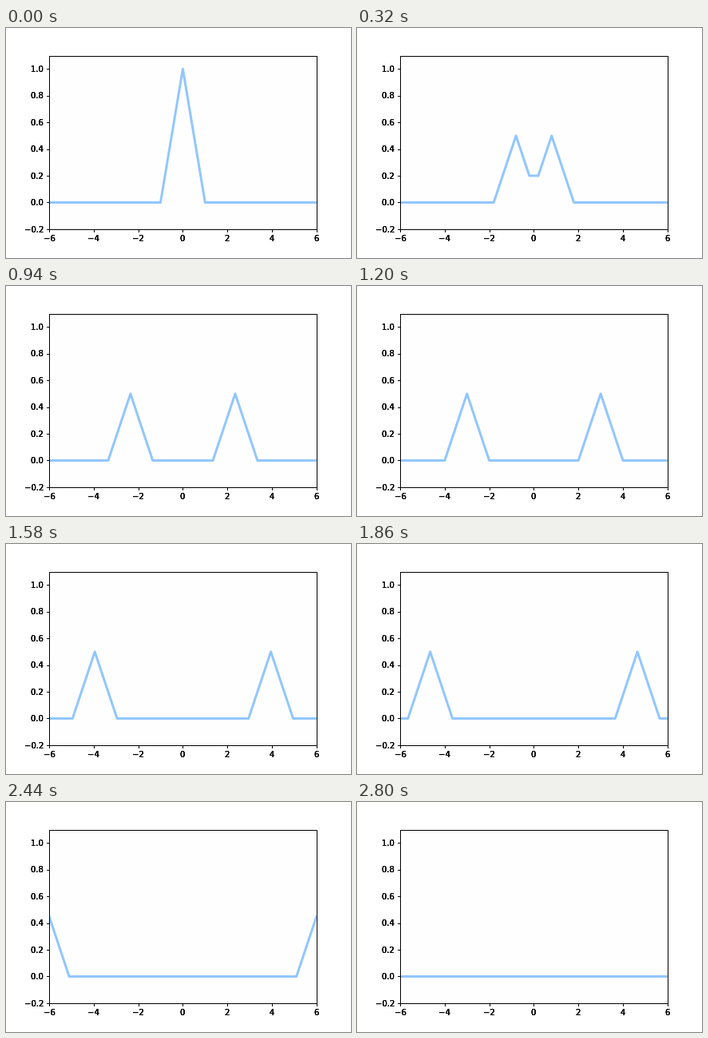
Animation, 432 px wide and 288 px high, one loop 3400 ms. Source, as an HTML page with a canvas:

```html
<!DOCTYPE html>
<html lang="en">
<head>
<meta charset="utf-8">
<title>Splitting wave</title>
<style>
html, body { margin: 0; width: 100%; height: 100%; overflow: hidden; background: #fff; }
canvas { display: block; }
</style>
</head>
<body>
<canvas id="plot" width="432" height="288"></canvas>
<script>
const ctx = document.getElementById('plot').getContext('2d');
const LEFT = 54, RIGHT = 388.8, TOP = 34.56, BOTTOM = 252;
const LOOP = 3400, STEP = 20, LAST = 140, SHIFT = 0.05;

const px = x => LEFT + (x + 6) / 12 * (RIGHT - LEFT);
const py = y => BOTTOM - (y + 0.2) / 1.3 * (BOTTOM - TOP);
const hat = x => Math.max(0, 1 - Math.abs(x));

// Repeated passes give the labels their heavy edges.
function label(text, x, y) {
  for (let i = 0; i < 4; i++) ctx.fillText(text, Math.round(x), y);
}

function drawAxes() {
  ctx.fillStyle = '#000';
  ctx.font = '10px "DejaVu Sans", sans-serif';
  for (let v = -6; v <= 6; v += 2) {
    const x = Math.round(px(v)), text = String(v).replace('-', '\u2212');
    ctx.fillRect(x, 252, 1, 4);
    label(text, px(v) - ctx.measureText(text).width / 2, 267);
  }
  for (let i = -1; i <= 5; i++) {
    const y = py(i / 5), text = (i / 5).toFixed(1).replace('-', '\u2212');
    ctx.fillRect(51, Math.round(y - 0.1), 4, 1);
    label(text, 47 - ctx.measureText(text).width, Math.round(y + 3.7));
  }
  ctx.strokeStyle = '#000';
  ctx.lineWidth = 1;
  ctx.strokeRect(54.5, 35.5, 335, 217);
}

function drawWave(shift) {
  const height = x => (hat(x - shift) + hat(x + shift)) / 2;
  const knots = [-6, 6];
  for (const centre of [-shift, shift])
    for (const d of [-1, 0, 1])
      if (Math.abs(centre + d) < 6) knots.push(centre + d);
  knots.sort((a, b) => a - b);

  ctx.save();
  ctx.beginPath();
  ctx.rect(LEFT, TOP, RIGHT - LEFT, BOTTOM - TOP);
  ctx.clip();
  ctx.beginPath();
  for (const x of knots) ctx.lineTo(px(x), py(height(x)));
  ctx.strokeStyle = '#92c6ff';
  ctx.lineWidth = 3;
  ctx.lineJoin = 'round';
  ctx.lineCap = 'square';
  ctx.stroke();
  ctx.restore();
}

function draw() {
  const step = Math.min(LAST, Math.floor(performance.now() % LOOP / STEP));
  ctx.fillStyle = '#fff';
  ctx.fillRect(0, 0, 432, 288);
  ctx.fillStyle = '#fefefe';
  ctx.fillRect(54, 35, 335, 217);
  drawWave(step * SHIFT);
  drawAxes();
  requestAnimationFrame(draw);
}
draw();
</script>
</body>
</html>
```
